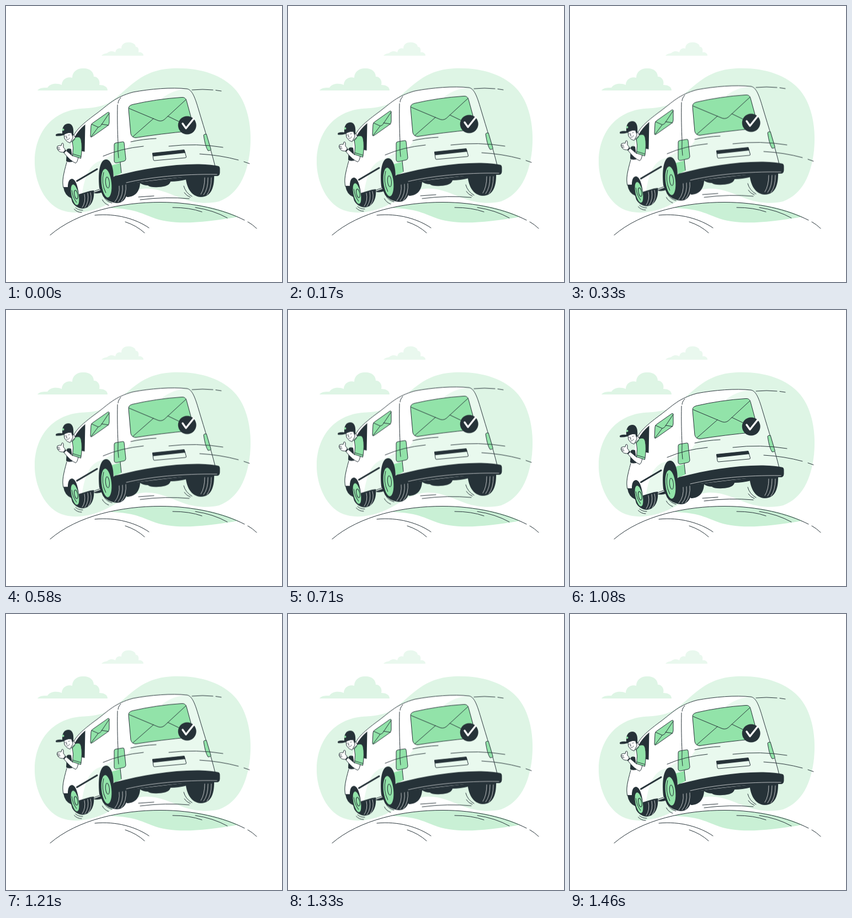
An HTML page that plays this animation: 500x500 px, repeating every 1.5 s.

```html
<!DOCTYPE html>
<html lang="en">
<head>
<meta charset="utf-8">
<title>Delivery van</title>
<style>
  html, body { margin: 0; width: 100%; height: 100%; overflow: hidden; background: #fff; }
  svg { display: block; width: 100%; height: 100%; }
  .ink { fill: #263238; }
  .line { fill: none; stroke: #263238; stroke-width: 1; stroke-linecap: round; stroke-linejoin: round; }
  .thin { stroke-width: .8; }
  .band { stroke-width: 2.2; }
  .trim { stroke-width: 3; }
  .white { fill: #fff; }
  .green { fill: #92e3a9; }
  .tint { fill: #e9f9ee; }
  .edge { stroke: #263238; stroke-width: 1; stroke-linejoin: round; }
  .tread { fill: none; stroke: #fff; stroke-width: .7; stroke-linecap: round; }
  .van { animation: bounce 1.5s -20ms linear infinite; }
  @keyframes bounce {
    0%, 100% { transform: translateY(.3px); }
    50% { transform: translateY(-9.7px); }
  }
</style>
</head>
<body>
<svg viewBox="0 0 500 500">
  <!-- backdrop -->
  <path fill="#def5e5" d="M52 280C53 226 87 187 142 185.500C162 184 176 182 190 173C221 153 241 116 301 113C347 111 392 123 417 153C440 181 446 226 442 262C437 306 421 341 386 354C366 359 342 357 322 350C297 341 276 329 249 331C218 334 205 350 176 363C152 373 128 377 108 372C70 364 51 316 52 280Z"/>
  <path fill="#def5e5" d="M57 153C62 147 70 148 75 148C80 140 92 139 101 143C101 133 111 127 120 130C120 119 129 113 139 113C151 112 159 119 159 128C167 128 171 136 169 143C177 143 184 146 184 153Z"/>
  <path fill="#e9f8ee" d="M173 90C177 85 182 87 185 84C190 81 195 82 198 84C199 78 204 75 209 77C209 70 214 66 220 66C228 65 235 69 235 74C240 74 241 79 240 84C245 83 249 86 249 90Z"/>

  <!-- hill -->
  <path fill="#c9f0d5" d="M188 366C220 358 250 355.500 280 355.500C340 355.500 388 366 421 382C350 394 300 397 265 383C238 372 225 367 188 366Z"/>
  <path class="line" d="M80 415C130 372 210 355.500 280 355.500C340 355.500 395 369 432 388M438 391Q447 396 454 403M161 379C200 375 236 386 259 402M216 391Q237 398 251 411M302 365Q333 365 355 373M343 365Q376 370 401 384"/>

  <g class="van">
    <!-- underbody and far wheels -->
    <path class="ink" d="M200 318L330 304L328 314Q312 318 298 318Q296 327 276 328Q262 329 257 325Q249 325 243 321C242 336 234 346 219 346ZM325 305L377 303C378 326 373 346 353 346C335 345 326 328 325 305ZM157 334L177 326L178 336Q164 342 158 338Z"/>
    <path class="tread" d="M360 311Q360 330 353 341M366 311Q366 332 358 342M372 311Q372 332 364 342"/>

    <!-- body -->
    <path class="white" d="M123 234C128 223 143 210 165 194C185 179 197 165 230 156C262 150 300 147 328 150C338 152 343 168 349 188C360 225 372 262 379 291L379 303L200 324L172 333L132 348L107 336C100 322 104 305 110 283Z"/>
    <path class="tint" d="M284 166C297 157 310 151 328 150C338 152 343 168 349 188C360 225 372 262 379 291L345 290L210 306L205 285C222 240 270 210 284 166ZM137 345C142 312 150 284 174 280C184 274 192 270 197 266L200 322L172 333Z"/>
    <path class="line" d="M123 234C128 223 143 210 165 194C185 179 197 165 230 156C262 150 300 147 328 150C338 152 343 168 349 188C360 225 372 262 379 291M110 283C104 305 101 317 104 329M132 346L172 331M208 166C205 169 203 173 203 176M202 179C201.500 205 202 228 203 248"/>
    <path class="line trim" d="M128.500 317L165 295.500"/>

    <!-- cab window -->
    <path class="ink" d="M124 238Q131 225 143.500 214.500L142.500 264L134 262Z"/>

    <!-- side window -->
    <path class="green edge" d="M154 217Q154 214 157 212L184 193Q187 191 187 195V211Q187 215 184 217L157 236Q153 239 153 235Z"/>
    <path class="line" d="M155 214L167 219.500Q171 219 173 215L187 194M167 219.500L154 237M173 214L186 216"/>

    <!-- rear window -->
    <g transform="translate(0 .5)">
      <path class="green edge" d="M222 186Q221.500 180 229 178Q272 168 318 165Q325 164 327 171L339 215Q341 224 332 226Q280 231 235 238Q228 238 226 231Z"/>
      <path class="line" d="M223 185L273 206Q281 210 287 205L326 169M267 203.500L230 236M293 199L320 212"/>
      <circle class="ink" cx="328.200" cy="215.500" r="16.500"/>
      <path fill="none" stroke="#fff" stroke-width="3.400" stroke-linecap="round" stroke-linejoin="round" d="M320 212.500L326 221L340 203.500"/>
    </g>

    <!-- lights and plate -->
    <path class="green edge" d="M196 251Q196 248.500 199 248L211 246Q214 245.500 214 248L217 277Q217 280 214 281L201 284Q196 285 196 280Z"/>
    <path class="line" d="M203 248Q202 262 204 275"/>
    <path class="green" d="M191 289L207 284L209 303L196 309Z"/>
    <path class="line" d="M207 283L209 302"/>
    <path class="green edge" d="M358 234Q358 232 363 232L371 259Q372 262 366 262Q361 255 358 234Z"/>
    <path class="tint edge" d="M265.500 267L323 261L326.500 273Q327 275 324 275L269 280Q267 280 267 278Z"/>
    <path class="ink" d="M265 266L323 260L325 266L266.500 272.500Z"/>

    <!-- front wheel -->
    <path class="ink" d="M104 328L112 328C112 318 115 313 120 313C126 314 130 326 132 341L152 335L159 334C161 352 153 367 138 367C130 366 124 362 120 355L118 348Q106 343 104 328Z"/>
    <g transform="rotate(-12 125 342)">
      <ellipse class="green" cx="125" cy="342" rx="6.500" ry="19"/>
      <ellipse class="line" cx="127" cy="342" rx="3" ry="8"/>
      <path class="line" d="M121 333Q120 346 125 356"/>
    </g>
    <path class="tread" d="M142 341Q145 355 138 365M148 339Q151 354 143 365M153 338Q157 352 149 363"/>

    <!-- rear wheel -->
    <path class="ink" d="M169 329C166 298 171 277 182 278C191 279 195 295 195 312L220 318C223 339 217 357 201 357C189 356 182 351 176 345Z"/>
    <g transform="rotate(-6 182 321)">
      <ellipse class="green" cx="182" cy="321" rx="9" ry="26"/>
      <ellipse class="line" cx="184" cy="320" rx="3.500" ry="10"/>
      <path class="line" d="M179 301Q172 320 179 338"/>
    </g>
    <path class="tread" d="M205 325Q207 343 197 355M211 324Q213 343 203 355M217 322Q219 342 209 354"/>

    <!-- bumper -->
    <path class="ink" d="M193 312Q194 309 199 307.500C248 295 300 286 350 286.500Q374 287 385 290Q387.500 291 387.500 295V302Q387 308 382 308C320 308 260 315 203 326Q196 327 195 322Z"/>
    <path class="tread" d="M218 320C260 310 320 304 382 305"/>

    <!-- driver -->
    <path class="ink" d="M110 260Q112 257 118 259L121 282Q112 284 109 281Z"/>
    <path class="white edge" d="M117 236L122 232L126 239L121 247L115 243Z"/>
    <path class="white edge" d="M105 232L106 240Q110 247 116 248L121 239V230L108 229Z"/>
    <path class="ink" d="M118 229L122 228Q123 233 120 236ZM102 231C101 219 106 213 113 213C120 213 123 221 122 230Q113 228 104 234Q97 236 91 235.500Q89 234 91 232Q96 230 102 231Z"/>
    <circle class="green" cx="103.500" cy="224" r="2"/>
    <path class="line thin" d="M107 236L109 235.500M113 234L115 233.500M110 236L109 239H111M110 242Q114 243 115 239"/>
    <path class="white edge" d="M121 270L131 274Q129 284 126 284.500Q117 281 105 266L108 261Q115 267 121 272Z"/>
    <path class="white edge" d="M93 254Q97 252 100 253L101 249Q103 247 104 250L104 256Q108 259 107 262L104 265Q97 265 95 262Q91 258 93 254Z"/>
    <path class="line" d="M93 257H97M94 260H98M104.500 264.500L108 261.500"/>
    <path class="line band" d="M105 265L108 262"/>
    <path class="green edge" d="M120 244L126 238Q134 235 136 242Q139 255 135.500 276L120.500 271Q123 257 120 244Z"/>
    <path class="line" d="M121 268L136 272.500M121 245L125 241"/>

    <!-- speed lines -->
    <path class="line" d="M176 272Q208 258 249 254M226 246Q248 241 272 240M295 254Q345 248 393 256M351 268Q388 270 421 279M431 282L441 285.500M337 152Q356 150 375 152M380 152.500L390 154M240 346L268 344M243 351Q290 345 332 349M126 365.500Q131 370 139 370M123.500 368Q129 374 137 374M178 347Q182 354 192 357M174.500 351Q178 358 186 361M322 326Q325 338 337 345M323 338Q327 344 334 346.500"/>
  </g>
</svg>
</body>
</html>
```
